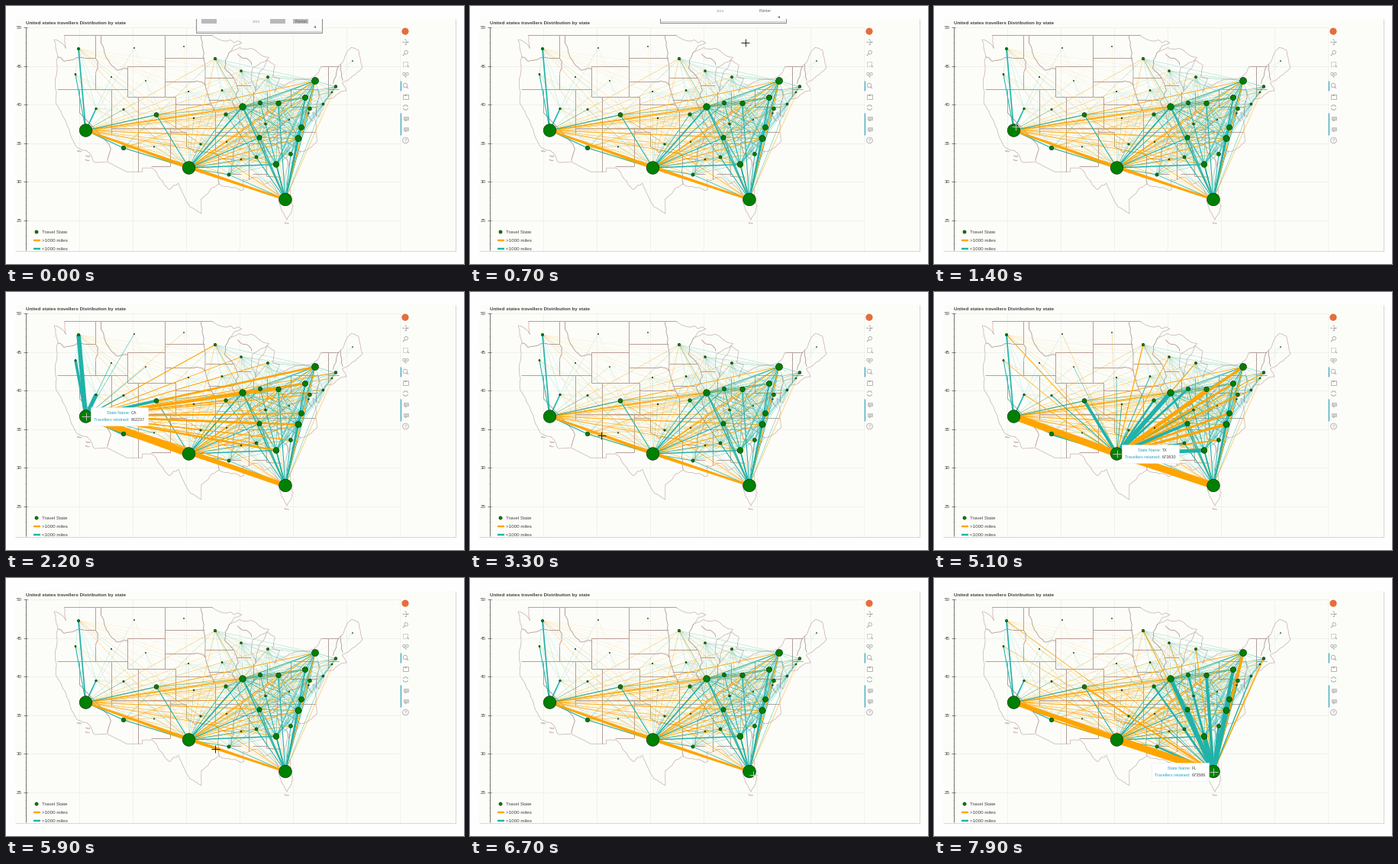
These frames come from a looping animation (600x338 px, 8 s). A matplotlib script:

```python
import itertools

import matplotlib.pyplot as plt
import numpy as np
from matplotlib.animation import FuncAnimation
from matplotlib.collections import LineCollection, PatchCollection
from matplotlib.patches import Arc, Circle, Polygon, Rectangle

W, H, DPI = 600, 338, 64
PX = 72 / DPI
STEP, FRAMES = 100, 80
ORANGE, TEAL, GREEN = "#ffa500", "#20b2aa", "#008000"
GRAY, BLUE, PAPER = "#b0b0b0", "#2aa5c4", "#fcfdf9"
rng = np.random.default_rng(5)

fig = plt.figure(figsize=(W / DPI, H / DPI), dpi=DPI, facecolor="#fefefe")
ax = fig.add_axes([0, 0, 1, 1])
ax.set(xlim=(0, W), ylim=(H, 0))
ax.axis("off")


def stroke(xs, ys, color, width=1.0, z=1.0):
    return ax.plot(xs, ys, color=color, lw=width * PX, zorder=z,
                   solid_capstyle="butt")[0]


def box(x, y, w, h, fill="none", edge="none", width=0.6, z=1.0):
    return ax.add_patch(Rectangle((x, y), w, h, fc=fill, ec=edge,
                                  lw=width * PX, zorder=z))


def label(x, y, text, size=6.3, color="#444444", ha="left", z=8, **kw):
    return ax.text(x, y, text, fontsize=size * PX, color=color, ha=ha,
                   va="center_baseline", zorder=z, family="Liberation Sans", **kw)


def to_px(lon, lat):
    return 96 + (np.asarray(lon) + 120) * 7.0, 28 + (50 - np.asarray(lat)) * 10.12


# Page, grid and axis
page = box(12, 17, 576.5, 303.5, PAPER, z=0)
stroke([12, 588.5, 588.5], [320.5, 320.5, 17], "#c9dcc5", 0.9)
for lon in range(-120, -59, 10):
    x, _ = to_px(lon, 0)
    stroke([x, x], [28, 320], "#ebebe8", 0.7)
for lat in range(50, 21, -1):
    _, y = to_px(0, lat)
    stroke([24.5, 26], [y, y], "#888888", 0.6)
    if lat % 5 == 0:
        stroke([26, 517], [y, y], "#ebebe8", 0.7)
        stroke([23, 28], [y, y], "#666666", 0.8)
        label(21, y, str(lat), 6.2, ha="right")
stroke([26.3, 26.3], [28, 320], "#555555", 0.8)
label(26, 22.3, "United states travellers Distribution by state", 6.25, weight="bold")


# Map: natural outlines are roughened by midpoint displacement
def rough(points, amount=0.07, depth=3):
    p = np.array(points, float)
    for _ in range(depth):
        d = np.diff(p, axis=0)
        mid = (p[:-1] + p[1:]) / 2
        mid += d[:, ::-1] * [-1, 1] * rng.normal(0, amount, (len(d), 1))
        p = np.insert(p, range(1, len(p)), mid, axis=0)
    return p


def outline(points, color, width):
    stroke(*to_px(*np.transpose(points)), color, width, 2)


def coast(*points):
    outline(rough(points), "#cdb8b4", 0.8)


def river(*points):
    outline(rough(points), "#b79f9a", 0.9)


def parallel(lat, *spans):
    for west, east in spans:
        outline([(west, lat), (east, lat)], "#b79f9a", 1)


def meridian(lon, north, south):
    outline([(lon, north), (lon, south)], "#b79f9a", 1)


coast((-122.8, 49), (-122.5, 47.3), (-124.7, 48.4), (-124, 46.2), (-124.5, 42.8),
      (-124.4, 40.4), (-122.5, 37.8), (-120.6, 34.6), (-118.4, 33.9), (-117.1, 32.5))
outline([(-117.1, 32.5), (-114.8, 32.6), (-111.1, 31.3), (-108.2, 31.3),
         (-108.2, 31.8), (-106.5, 31.8)], "#cdb8b4", 0.8)
coast((-106.5, 31.8), (-103.2, 29), (-101.4, 29.8), (-99.3, 26.8), (-97.2, 25.9),
      (-97.2, 27.8), (-93.8, 29.7), (-89.2, 29), (-89.4, 30.3), (-86.3, 30.4),
      (-85.3, 29.7), (-84.2, 30.1), (-82.8, 28.4), (-81.1, 25.1), (-80.1, 26.8),
      (-81.5, 30.7), (-80.8, 32.1), (-78.6, 33.9), (-75.5, 35.2), (-76.3, 39),
      (-75.1, 38.4), (-74, 40.6), (-71.4, 41.5), (-70, 41.8), (-70.8, 42.8),
      (-67, 44.8), (-67.8, 47.1), (-69.1, 47.4), (-71.5, 45))
coast((-74.7, 45), (-76.2, 43.5), (-79, 43.3), (-83.4, 41.7), (-82.5, 43.4),
      (-83.9, 43.7), (-83.4, 45.1), (-84.8, 45.8), (-86.4, 44), (-87, 41.7),
      (-87.8, 43), (-87.5, 44.8), (-84.5, 46.1), (-87.9, 47.3), (-92, 46.7),
      (-89.6, 48), (-95.2, 49))
for lon, lat in ((-120, 34), (-118.4, 33.4), (-118.5, 32.9), (-81.2, 24.7)):
    coast((lon - 0.4, lat), (lon + 0.4, lat - 0.1), (lon - 0.4, lat))

for lat, *spans in ((49, (-122.8, -95.2)), (46, (-119, -117), (-104, -96.6)),
                    (45, (-111, -104), (-74.7, -71.5)), (43.5, (-96.5, -91.2)),
                    (43, (-104, -98.5)), (42.5, (-90.6, -87.8)),
                    (42, (-124.2, -111), (-79.8, -75.4), (-73.5, -71.4)),
                    (41, (-111, -102)), (40.6, (-95.8, -91.6)), (40, (-102, -95.3)),
                    (39.7, (-80.5, -75.5)), (37, (-114, -94.6)),
                    (36.5, (-103, -100), (-94.6, -89.7), (-89.5, -75.9)),
                    (35, (-90.1, -83.1)), (33, (-94, -91.1)),
                    (32, (-106.6, -103)), (31, (-91.6, -89.7), (-87.6, -85))):
    parallel(lat, *spans)
for line in ((-120, 42, 39), (-117, 49, 46), (-117, 44, 42), (-116, 49, 48),
             (-114, 42, 36.2), (-111, 45, 41), (-109, 41, 31.3), (-104, 49, 41),
             (-103, 37, 32), (-102, 41, 37), (-100, 36.5, 34.6), (-94.6, 39.1, 34),
             (-94, 33.5, 31.9), (-88.3, 35, 30.3), (-87.5, 41.7, 39.3),
             (-84.8, 41.7, 39.1), (-80.5, 42, 39.7), (-75.7, 39.7, 38.4),
             (-73.4, 45, 41)):
    meridian(*line)
outline([(-120, 39), (-114.6, 35)], "#b79f9a", 1)
outline([(-85.6, 35), (-85, 32.2), (-84.9, 30.7), (-82.2, 30.6)], "#b79f9a", 1)

river((-124, 46.2), (-122.8, 45.6), (-119, 46))
river((-117, 46), (-116.5, 45.5), (-117, 44))
river((-116, 48), (-114.4, 45.5), (-113, 44.5), (-111, 44.6))
river((-114.6, 35), (-114.1, 34.3), (-114.7, 32.7))
river((-100, 34.6), (-96.6, 33.8), (-94, 33.5))
river((-97.2, 49), (-96.5, 45.3), (-96.4, 42.5), (-95.3, 40), (-94.6, 39.1))
river((-98.5, 43), (-96.4, 42.5))
river((-94, 31.9), (-93.8, 29.7))
river((-92, 46.7), (-92.8, 44.7), (-91.2, 43.5), (-90.2, 41.8), (-91.4, 40.4),
      (-89.2, 37), (-91.1, 33), (-91.6, 31))
river((-89.2, 37), (-86, 38), (-84.8, 39.1), (-82.6, 38.4), (-80.5, 40.6))
river((-88, 37.9), (-87.5, 39.3))
river((-90.4, 46.6), (-87.7, 45.1))
river((-83.1, 35), (-80.9, 32.1))
river((-83.1, 35), (-81, 35.1), (-78.6, 33.9))
river((-84.3, 35), (-81.7, 36.6))
river((-83.7, 36.6), (-82, 37.5), (-82.6, 38.2))
river((-82, 37.5), (-79.5, 38.4), (-77.7, 39.3), (-76.3, 37.9))
river((-75.5, 39.7), (-75.1, 41), (-75.4, 42))
river((-72.5, 42.7), (-71.5, 45))
river((-70.7, 43.1), (-71.1, 45.3))

# States: three hubs, the rest in falling order of travellers
hubs = dict(CA=(104.5, 163), TX=(239.5, 212), FL=(366, 253.5))
ranked = dict(
    NY=(405, 98), IL=(310, 132), NC=(383, 173.5), GA=(354, 207.5), PA=(392, 120),
    VA=(387, 159), OH=(357, 127.5), TN=(332, 172.5), CO=(197, 142.5), AZ=(154, 186),
    IN=(333, 127), SC=(373, 194), MD=(398, 134.5), MO=(288, 142), LA=(292, 221),
    AL=(328, 198), MA=(432, 105.5), MN=(274, 69), WA=(95, 56), MI=(343, 93),
    NJ=(415.5, 128.5), KY=(340, 154.5), WI=(308, 85), NV=(118, 134.5),
    OK=(255, 181), UT=(154, 135.5), OR=(91, 89.5), IA=(283, 110.5), CT=(427, 113),
    KS=(246, 147), MS=(308, 201), DC=(396.5, 140.5), AR=(289, 178), NE=(239, 112),
    NM=(194, 184.5), ID=(138, 93), WV=(371, 149), MT=(168, 55), WY=(183, 98),
    ND=(233, 53), ME=(454, 72))
nodes = {name: (*p, 8.3) for name, p in hubs.items()}
nodes.update({name: (*p, 4.5 * np.exp(-k / 18))
              for k, (name, p) in enumerate(ranked.items())})


def miles(a, b):
    lon, lat = np.radians([[(p[0] - 96) / 7.0 - 120, 50 - (p[1] - 28) / 10.12]
                           for p in (a, b)]).T
    h = (np.sin((lat[1] - lat[0]) / 2) ** 2
         + np.prod(np.cos(lat)) * np.sin((lon[1] - lon[0]) / 2) ** 2)
    return 7918 * np.arcsin(np.sqrt(h))


# Gravity model: traffic grows with both sizes and falls with distance
edges = []
for (m, a), (n, b) in itertools.combinations(nodes.items(), 2):
    gap = np.hypot(a[0] - b[0], a[1] - b[1])
    near = miles(a, b) < 1000
    flow = 0.05 * (a[2] * b[2]) ** 1.3 * (np.exp(-gap / 400) + 0.3 * np.exp(-gap / 50))
    if near:
        flow *= 1.4
    if max(a[0], b[0]) < 120:  # busy Pacific routes
        flow *= 3.3
    if flow > (0.1 if near else 0.22):
        edges.append((m, n, [a[:2], b[:2]], flow, TEAL if near else ORANGE))
edges.sort(key=lambda e: e[3])


def bundle(group, scale, z):
    lines = LineCollection([e[2] for e in group], colors=[e[4] for e in group],
                           linewidths=[e[3] * scale * PX for e in group], zorder=z)
    return ax.add_collection(lines, autolim=False)


bundle(edges, 0.3, 3)
ax.add_collection(PatchCollection([Circle((x, y), r) for x, y, r in nodes.values()],
                                  fc=GREEN, ec="#0a2a0a", lw=0.6 * PX, zorder=5),
                  autolim=False)

# Legend
ax.add_patch(Circle((40, 296), 2.1, fc=GREEN, ec="#0a2a0a", lw=0.5 * PX, zorder=7))
rows = ((296, "Travel State", None), (307, ">1000 miles", ORANGE),
        (317.8, "<1000 miles", TEAL))
for y, text, color in rows:
    label(47, y, text).set_clip_path(page)
    if color:
        stroke([35.5, 45], [y, y], color, 2.4, 7)


# Toolbar
def ring(x, y, r):
    ax.add_patch(Circle((x, y), r, fc="none", ec=GRAY, lw=0.9 * PX, zorder=4))


def handle(x, y, reach=2.5):
    stroke([x, x + reach], [y, y + reach], GRAY, 1.2, 4)


def bubble(y):
    box(520.5, y - 3, 6.5, 4.8, "#d0d0d0", GRAY, z=4)
    ax.add_patch(Polygon([(522, y + 2), (525.5, y + 2), (523.7, y + 4)],
                         fc=GRAY, zorder=4))


ax.add_patch(Circle((523, 33.2), 4.6, fc="#e2703a", zorder=4))
for dx, dy in ((1, 0), (-1, 0), (0, 1), (0, -1)):
    tip = np.array([523.5 + 4.3 * dx, 47.3 + 4.3 * dy])
    back = tip - 1.6 * np.array([dx, dy])
    side = 1.5 * np.array([dy, dx])
    stroke([523.5, back[0]], [47.3, back[1]], GRAY, 1, 4)
    ax.add_patch(Polygon([tip, back + side, back - side], fc=GRAY, zorder=4))
ring(524.2, 60.7, 2.3)
stroke([522.5, 520], [62.5, 65], GRAY, 1.3, 4)
box(520, 72.5, 6, 6, edge=GRAY, width=0.8, z=4).set_linestyle((0, (2, 1)))
handle(525.5, 77.5)
ring(521.5, 89, 1.7)
ring(525.5, 89, 1.7)
handle(522, 91)
ring(523, 104, 2.8)
handle(524.5, 105.5)
box(520, 115.5, 7, 6.8, edge=GRAY, width=0.9, z=4)
box(521.8, 115.5, 3.4, 2.2, GRAY, z=4)
for start in (20, 200):
    ax.add_patch(Arc((523.5, 133), 6.4, 6.4, theta1=start, theta2=start + 145,
                     ec=GRAY, lw=1.1 * PX, zorder=4))
bubble(147.5)
bubble(161.5)
ring(523.5, 176, 3.8)
label(523.5, 176.2, "?", 5.8, GRAY, "center", 4, weight="bold")
for top, bottom in ((97.5, 111), (140, 168.5)):
    stroke([516.8, 516.8], [top, bottom], BLUE, 1.1, 4)


# Hover: thick links plus tooltip
def hover(state, count, left=False):
    x, y, _ = nodes[state]
    x0 = x - 81 if left else x + 6.5
    edge = x0 + 75 if left else x0
    tip = x - 2 if left else x + 2
    parts = [bundle([e for e in edges if state in e[:2]], 1, 4),
             ax.add_patch(Polygon([(edge, y - 4), (tip, y), (edge, y + 4)],
                                  fc="white", zorder=4.5)),
             box(x0, y - 12, 75, 24, "white", "#ececec", 0.6, 9)]
    for dy, name, value in ((-4.6, "State Name:", state),
                            (4.4, "Travellers retained:", str(count))):
        parts += [label(x0 + 51, y + dy, name, 5.5, BLUE, "right", 10),
                  label(x0 + 52.8, y + dy, value, 5.5, z=10)]
    return parts


hovers = {"CA": hover("CA", 662237), "TX": hover("TX", 673830),
          "FL": hover("FL", 673586, left=True)}

# Recorder panel sliding out at the top
panel = [box(248.5, 10, 165, 25, "#fbfbfb", "#8f8f8f", 1.1, 11),
         box(249.2, 33.2, 163.6, 1.2, "#c8c8c8", z=11)]
panel += [box(x, 13, 20, 9.5, "#b9b9b9", z=12) for x in (256, 346, 376)]
panel += [label(327.5, 19.5, "area", 5, "#aaaaaa", "center", 13),
          label(386.5, 19.5, "Pointer", 5, "#666666", "center", 13),
          label(403.5, 27, "\u25c4", 5, "#666666", "center", 13)]
rest = [part.get_y() if isinstance(part, Rectangle) else part.get_position()[1]
        for part in panel]
for part in panel:
    part.set_clip_path(page)

# Crosshair pointer: time, x, y
path = np.array([(600, 403, 30), (1300, 107, 158), (1400, 107, 158),
                 (1500, *hubs["CA"]), (2750, *hubs["CA"]), (3850, *hubs["TX"]),
                 (5650, *hubs["TX"]), (6600, 371, 257.5), (6700, 371, 257.5),
                 (6800, *hubs["FL"])])
cross = [stroke([], [], "black", 0.9, 14) for _ in range(2)]


def update(i):
    t = i * STEP
    lift = 19 * t / 1000
    for part, y in zip(panel, rest):
        part.set_y(y - lift)
        part.set_visible(t < 1000)

    x, y = (np.interp(t, path[:, 0], path[:, k]) for k in (1, 2))
    reach = {s: np.hypot(x - a, y - b) for s, (a, b) in hubs.items()}
    for state, parts in hovers.items():
        for part in parts:
            part.set_visible(reach[state] < 5)

    cross[0].set_data([x - 5.5, x + 5.5], [y, y])
    cross[1].set_data([x, x], [y - 5, y + 5])
    for arm in cross:
        arm.set_color("#d8c4d8" if min(reach.values()) < 8 else "#111111")
        arm.set_visible(t > 600)
    return []


anim = FuncAnimation(fig, update, frames=FRAMES, interval=STEP, repeat=True,
                     repeat_delay=0, blit=False)
plt.show()
```
